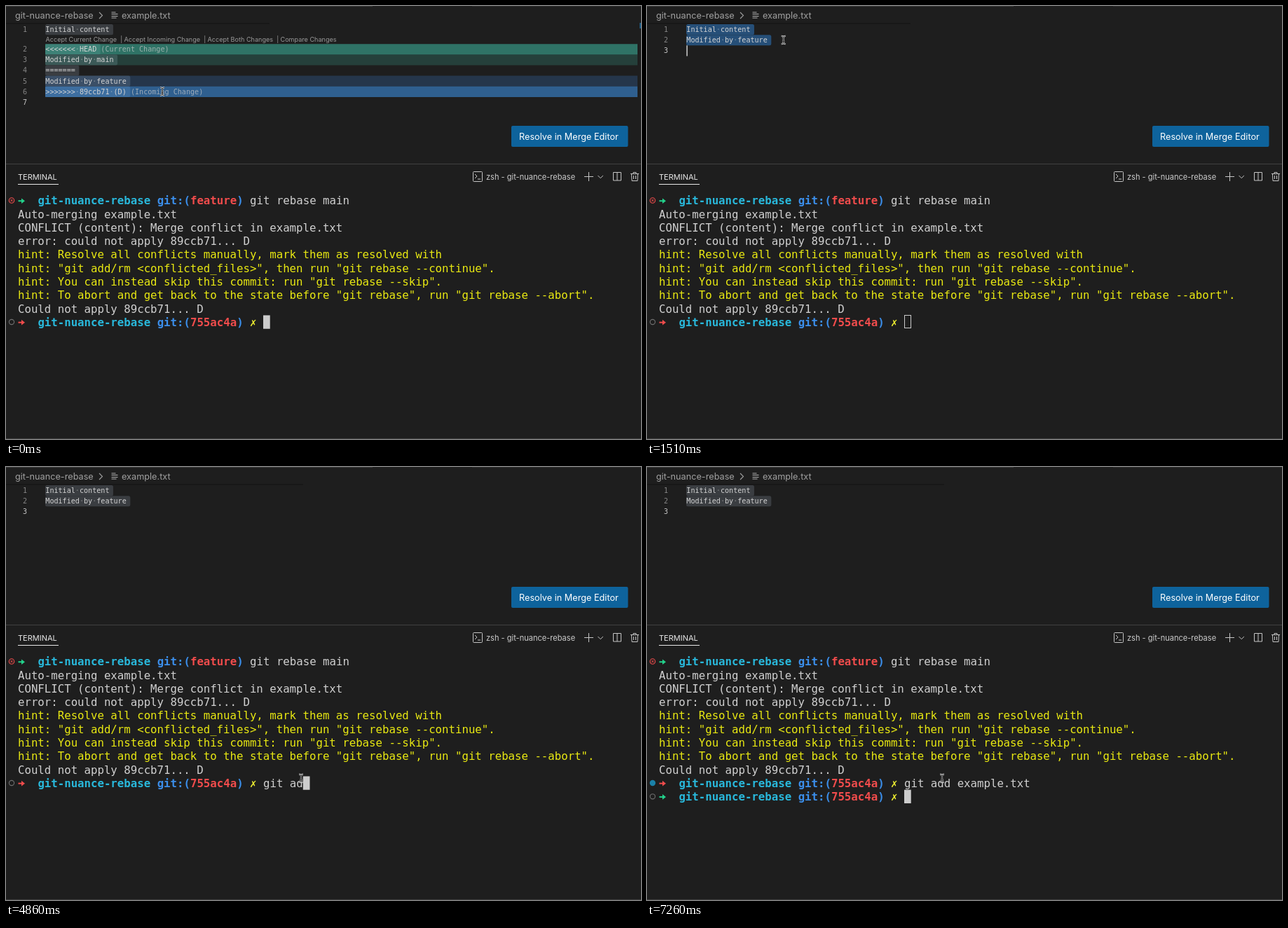
Recreate the animation shown at these times as an HTML page with a canvas. Size 906x618 px, loop 8000 ms.

```html
<!DOCTYPE html>
<html lang="en">
<head>
<meta charset="utf-8">
<style>
  html, body { margin: 0; width: 100%; height: 100%; overflow: hidden; background: #1e1e1e; }
  canvas { display: block; }
</style>
</head>
<body>
<canvas id="stage" width="906" height="618"></canvas>
<script>
const ctx = document.getElementById('stage').getContext('2d');
const LOOP = 8000;
const MONO = '"DejaVu Sans Mono", monospace';
const UI = 'Inter, sans-serif';
const CODE = { x: 56.3, top: 26, row: 15.15, char: 6.08, font: `10.1px ${MONO}` };
const TERM = { x: 17, top: 268, row: 19.27, char: 9.46, size: 15.713 };
const C = {
  fg: '#d0d0d0', red: '#f14c4c', green: '#23d18b', cyan: '#29b8db',
  blue: '#3b8eea', yellow: '#e9e912', dim: '#a0a0a0'
};

const CONFLICT = [
  { text: 'Initial content' },
  { text: '<<<<<<< HEAD', note: '(Current Change)', back: 'rgba(64,200,174,.5)' },
  { text: 'Modified by main', back: 'rgba(64,200,174,.2)' },
  { text: '=======' },
  { text: 'Modified by feature', back: 'rgba(64,150,255,.2)' },
  { text: '>>>>>>> 89ccb71 (D)', note: '(Incoming Change)', back: 'rgba(64,160,255,.5)' },
  { text: '' }
];
const RESOLVED = [CONFLICT[0], { text: 'Modified by feature' }, { text: '' }];

const OUTPUT = [
  ['Auto-merging example.txt', C.fg],
  ['CONFLICT (content): Merge conflict in example.txt', C.fg],
  ['error: could not apply 89ccb71... D', C.fg],
  ['hint: Resolve all conflicts manually, mark them as resolved with', C.yellow],
  ['hint: "git add/rm <conflicted_files>", then run "git rebase --continue".', C.yellow],
  ['hint: You can instead skip this commit: run "git rebase --skip".', C.yellow],
  ['hint: To abort and get back to the state before "git rebase", run "git rebase --abort".', C.yellow],
  ['Could not apply 89ccb71... D', C.fg]
];

const COMMAND = 'git add example.txt ';
// [time, characters typed]
const TYPING = [[4210, 1], [4300, 2], [4480, 4], [4650, 5], [4860, 6], [5040, 7],
  [5490, 8], [5760, 9], [5940, 10], [6480, 20]];

function text(str, x, y, font, color) {
  ctx.font = font;
  ctx.fillStyle = color;
  ctx.fillText(str, x, y);
}
function rect(x, y, w, h, color, radius = 0) {
  ctx.fillStyle = color;
  ctx.beginPath();
  ctx.roundRect(x, y, w, h, radius);
  ctx.fill();
}
function stroke(path, color, width = 1) {
  ctx.strokeStyle = color;
  ctx.lineWidth = width;
  ctx.stroke(new Path2D(path));
}
function dot(x, y, r, color, filled) {
  ctx.beginPath();
  ctx.arc(x, y, r, 0, 7);
  ctx.fillStyle = ctx.strokeStyle = color;
  ctx.lineWidth = 1.1;
  filled ? ctx.fill() : ctx.stroke();
}

function drawChrome(t) {
  rect(0, 0, 906, 618, '#1e1e1e');
  rect(0, 0, 523, 1, '#383838');
  rect(665, 0, 241, 1, '#2b2b2b');
  rect(0, 24, t < 3060 ? 376 : 424, 2, '#181818');
  rect(0, 617, 906, 1, '#3c3c3c');

  text('git-nuance-rebase', 13, 18, `12.7px ${UI}`, C.dim);
  text('example.txt', 165, 18, `12.7px ${UI}`, C.dim);
  stroke('M133 9l4.5 4.5-4.5 4.5', C.dim, 1.1);
  stroke('M150.5 9h6M150.5 11.5h9M150.5 14.5h9M150.5 17h7', '#b8b8b8');

  rect(721, 171, 166.5, 30, '#0e639c', 2);
  text('Resolve in Merge Editor', 732, 190.7, `12.7px ${UI}`, '#fff');

  rect(0, 225, 906, 1, '#414141');
  text('TERMINAL', 17, 247.7, `11px ${UI}`, '#e7e7e7');
  rect(17, 254, 58, 1, '#e7e7e7');
  text('zsh - git-nuance-rebase', 685, 247.7, `11.05px ${UI}`, '#cccccc');
  stroke('M667.5 236.5h11q1 0 1 1v12q0 1-1 1h-11q-1 0-1-1v-12q0-1 1-1z'
    + 'M669 240l3 3-3 3M673 247h4', '#c5c5c5');
  stroke('M825 243.5h13M831.5 237v13M844.5 242l3.7 3.7 3.7-3.7', '#c5c5c5');
  stroke('M866.5 237.5h11v11.5h-11zM872 237.5v11.5', '#c5c5c5');
  stroke('M891 239.5h12M895 239.5v-2h4v2M892.5 239.5l.5 10h8l.5-10M895.5 242v5M898.5 242v5', '#c5c5c5');
}

function drawLens(y, hovered) {
  const font = `9.1px ${UI}`;
  [['Accept Current Change', 56.5], ['Accept Incoming Change', 168.5],
    ['Accept Both Changes', 287.5], ['Compare Changes', 391.5]].forEach(([label, x], i) => {
    if (i) text('|', x - 5.2, y, font, '#999');
    text(label, x, y, font, i === 1 && hovered ? '#4e94ce' : '#999');
  });
}

function drawEditor(t, focused) {
  const conflict = t < 1510;
  const lines = conflict ? CONFLICT : RESOLVED;
  const { x, row, char, font } = CODE;
  if (conflict) {
    drawLens(51.3, t >= 770);
    rect(904, 24, 2, 8, '#1f5c85');
  }
  lines.forEach((line, i) => {
    const y = CODE.top + i * row + (conflict && i ? 13 : 0);
    const base = y + 11;
    const n = line.text.length;
    if (n) rect(x - .3, y, (n + 1) * char - .3, row, focused ? '#264f78' : '#3a3d41', 2.5);
    if (line.back) rect(x - .3, y, 845, row, line.back);
    text(i + 1, 24, base, font, n ? '#858585' : '#c6c6c6');
    text(line.text, x, base, font, '#d4d4d4');
    text(line.text.replace(/\S/g, ' ').replace(/ /g, (s, k) => line.text[k] === ' ' ? '·' : ' '),
      x, base, font, 'rgba(227,228,226,.4)');
    if (line.note) text(line.note, x + (n + 1) * char, base, font, 'rgba(204,204,204,.7)');
    const caretOn = t < 1960 || (t >= 2460 && t < 2880) || t >= 3380;
    if (!n && focused && caretOn) rect(x, y, 1.6, row, '#c4c4c4');
  });
}

function termText(str, col, row, color, bold) {
  text(str, TERM.x + col * TERM.char, TERM.top + row * TERM.row + 15.4,
    `${bold ? 'bold ' : ''}${TERM.size}px ${MONO}`, color);
}
function drawPrompt(row, arrowColor, branch, dirty) {
  const y = TERM.top + row * TERM.row + 10.2;
  stroke(`M17.5 ${y}h6`, arrowColor, 2);
  ctx.fillStyle = arrowColor;
  ctx.fill(new Path2D(`M22 ${y - 3.8}l5 3.8-5 3.8z`));
  termText('git-nuance-rebase', 3, row, C.cyan, true);
  termText('git:(', 21, row, C.blue, true);
  termText(branch, 26, row, C.red, true);
  termText(')', 33, row, C.blue, true);
  if (dirty) termText('✗', 35, row, '#f0f030', true);
}
function drawBlock(col, row, filled) {
  const x = TERM.x + col * TERM.char, y = TERM.top + row * TERM.row;
  if (filled) return rect(x, y, 9.7, 19.3, '#cccccc');
  ctx.strokeStyle = '#cccccc';
  ctx.lineWidth = 1;
  ctx.strokeRect(Math.round(x) + .5, Math.round(y) + .5, 9, 18);
}

function drawTerminal(t, focused) {
  drawPrompt(0, C.green, 'feature', false);
  termText('git rebase main', 35, 0, C.fg);
  dot(8, 277.5, 3.7, C.red);
  stroke('M6.4 275.9l3.2 3.2M9.6 275.9l-3.2 3.2', C.red);
  OUTPUT.forEach(([str, color], i) => termText(str, 0, i + 1, color));

  const typed = TYPING.reduce((n, [at, count]) => t >= at ? count : n, 0);
  drawPrompt(9, C.red, '755ac4a', true);
  termText(COMMAND.slice(0, typed), 37, 9, C.fg);
  const finished = t >= 7150;
  dot(8, 451, finished ? 4.2 : 3.6, finished ? '#1b81a8' : '#707070', finished);

  if (t >= 7260) {
    drawPrompt(10, C.green, '755ac4a', true);
    dot(8, 470.3, 3.6, '#707070');
    drawBlock(37, 10, true);
  } else if (t >= 7050) {
    drawBlock(0, 10, true);
  } else {
    drawBlock(37 + typed, 9, focused);
  }
}

// Eased pointer travel, held in equal time steps.
function glide(t, start, end, steps, from, to) {
  const k = t < start ? 0 : Math.min(1, (Math.floor((t - start) / (end - start) * (steps - 1)) + 1) / steps);
  const e = k * k * (3 - 2 * k);
  return from.map((v, i) => v + (to[i] - v) * e);
}
function drawPointer(t) {
  const [x, y] = t < 950 ? glide(t, 90, 860, 10, [223, 122], [197.5, 55.5])
    : t < 1420 ? [197, 54.5]
    : glide(t, 3060, 3490, 6, [194.7, 48.5], [421, 444.3]);
  const beam = `M${x - 3} ${y - 5.6}q3 0 3 2v7.2q0 2-3 2M${x + 3} ${y - 5.6}q-3 0-3 2v7.2q0 2 3 2M${x - 1.5} ${y + 2}h3`;
  stroke(beam, '#d8d8d8', 2.2);
  stroke(beam, '#222', .8);
}

function frame(now) {
  const t = now % LOOP;
  const editing = t >= 1420 && t < 3580;
  drawChrome(t);
  drawEditor(t, editing);
  drawTerminal(t, !editing);
  drawPointer(t);
  requestAnimationFrame(frame);
}
requestAnimationFrame(frame);
</script>
</body>
</html>
```
